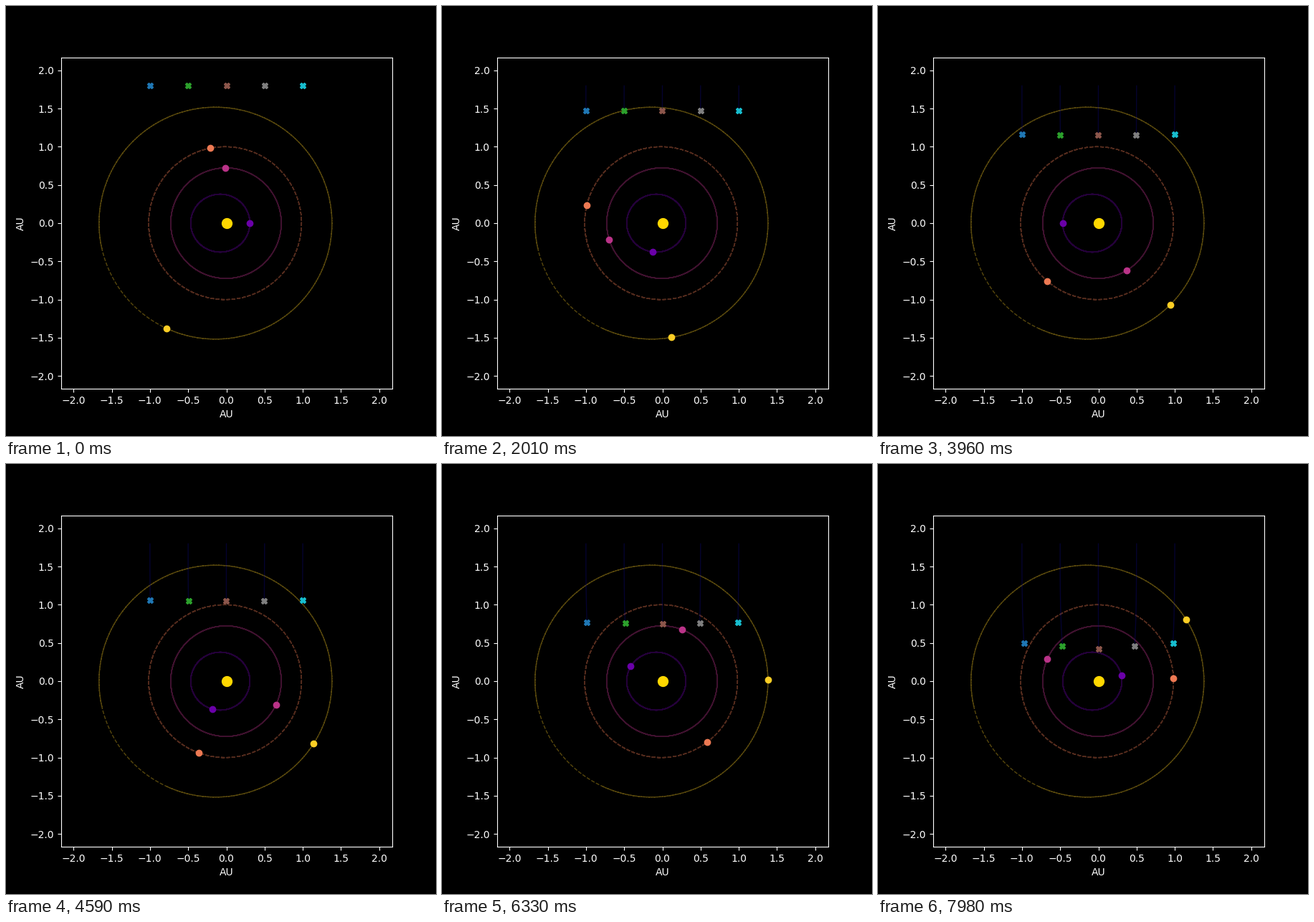
A matplotlib script that plays this animation: 600x600 px, repeating every 8000 ms.

```python
import numpy as np
import matplotlib.pyplot as plt
from matplotlib.animation import FuncAnimation

FRAMES = 267          # one day per frame
LOOP_MS = 8000
LIMIT = 1.3 * 1.666
ORBIT_DAYS = 1270

# semi-major axis (AU), eccentricity, period (days), mean anomaly at start (deg)
PLANETS = [
    (0.3871, 0.2056, 87.97, 0),
    (0.7233, 0.0068, 224.70, 90),
    (1.0000, 0.0167, 365.26, 100),
    (1.5237, 0.0934, 686.98, 250),
]


def kepler(a, e, period, phase, days):
    """Position on an ellipse with the Sun at the origin, perihelion on +x."""
    mean = np.radians(phase) + 2 * np.pi * days / period
    ecc = mean + e * np.sin(mean)
    for _ in range(8):
        ecc -= (ecc - e * np.sin(ecc) - mean) / (1 - e * np.cos(ecc))
    return a * (np.cos(ecc) - e), a * np.sqrt(1 - e * e) * np.sin(ecc)


def pull(pos):
    r = np.hypot(pos[:, 0], pos[:, 1])[:, None]
    return -4.3e-6 * pos / r ** 3.7


def fly(starts, speed):
    """Daily positions of probes falling towards the Sun (leapfrog steps)."""
    pos = np.column_stack([starts, np.full(len(starts), 1.797)])
    vel = np.tile([0.0, -speed], (len(starts), 1))
    path = [pos.copy()]
    for _ in range(FRAMES - 1):
        vel += pull(pos) / 2
        pos += vel
        vel += pull(pos) / 2
        path.append(pos.copy())
    path = np.array(path)
    day = np.arange(FRAMES)
    path[:, :, 0] -= 0.001 * np.sin(2 * np.pi * day / 380)[:, None]
    return path


plt.style.use("dark_background")
fig, ax = plt.subplots(figsize=(6, 6), dpi=100)
ax.set_aspect("equal")
ax.set_xlim(-LIMIT, LIMIT)
ax.set_ylim(-LIMIT, LIMIT)
ax.set_xlabel("AU")
ax.set_ylabel("AU")

days = np.arange(FRAMES)
span = np.arange(ORBIT_DAYS)
tracks, dots = [], []
for planet, c in zip(PLANETS, np.linspace(0.2, 0.9, 4)):
    color = plt.cm.plasma(c)
    ax.plot(*kepler(*planet, span), "--", color=color, lw=1, alpha=0.35)
    tracks.append(np.column_stack(kepler(*planet, days)))
    dots += ax.plot([], [], "o", color=color, ms=6, zorder=3)

probes = fly(np.linspace(-1, 1, 5), 0.00478)
trails, crosses = [], []
for i, c in enumerate(np.linspace(0, 1, 5)):
    trails += ax.plot([], [], color=plt.cm.plasma(0.0), lw=1, alpha=0.35)
    crosses += ax.plot([], [], "X", color=plt.cm.tab10(c), ms=6, zorder=4)

ax.plot(0, 0, "o", color="gold", ms=10, zorder=3)


def update(n):
    for dot, track in zip(dots, tracks):
        dot.set_data(track[n:n + 1].T)
    for i, (trail, cross) in enumerate(zip(trails, crosses)):
        trail.set_data(probes[:n + 1, i].T)
        cross.set_data(probes[n:n + 1, i].T)
    return dots + trails + crosses


anim = FuncAnimation(fig, update, frames=FRAMES, interval=LOOP_MS / FRAMES,
                     repeat=True, repeat_delay=0)
plt.show()
```
